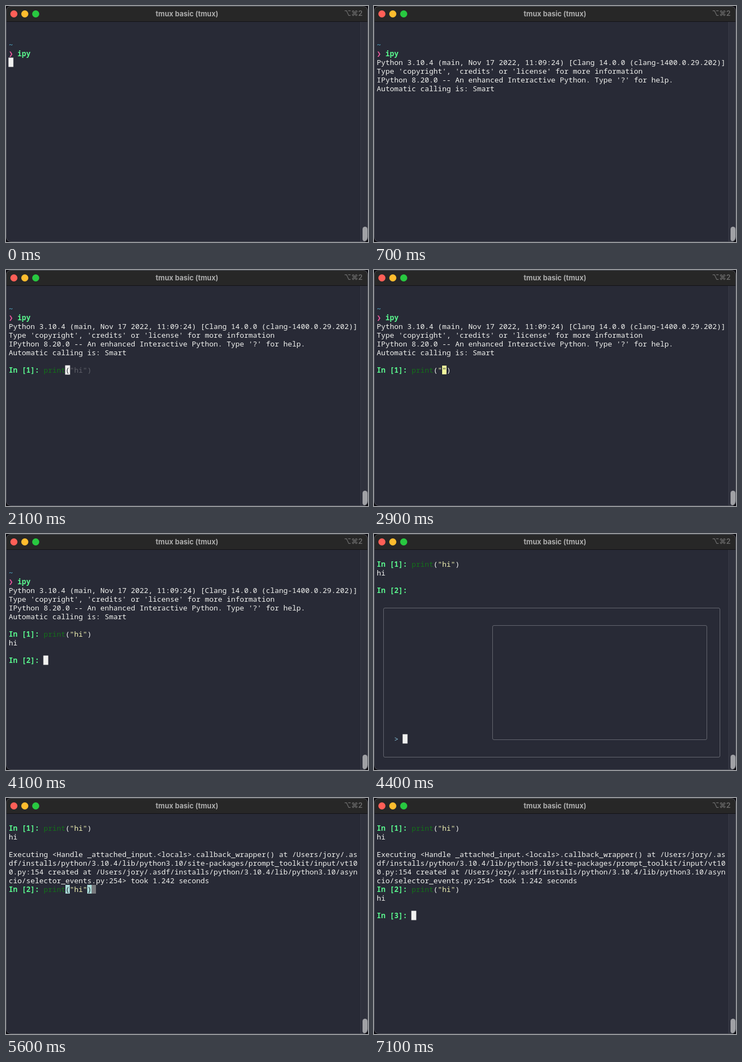
An HTML page for the animation above (8000 ms loop, 664x432 px).

```html
<!DOCTYPE html>
<html lang="en">
<head>
<meta charset="utf-8">
<title>Terminal</title>
<style>
html, body { margin: 0; width: 100%; height: 100%; overflow: hidden; background: #0c0b10; }
#win { position: absolute; left: 0; top: 0; width: 664px; height: 432px; box-sizing: border-box; overflow: hidden; border-radius: 9px; background: #282a36; }
#edge { position: absolute; inset: 0; border: 1px solid #50525a; border-radius: 9px; }
#bar { position: absolute; left: 0; top: 0; width: 664px; height: 28px; background: #272727; border-bottom: 1px solid #121216; color: #acacac; font: 700 13px/28px Inter, sans-serif; text-align: center; }
#bar i { position: absolute; top: 7.5px; width: 13px; height: 13px; border-radius: 50%; }
#bar span { position: absolute; right: 10px; top: -1px; color: #6b6b6b; font: 600 13px/28px Inter, "DejaVu Sans", sans-serif; }
#track { position: absolute; left: 650px; top: 29px; width: 14px; height: 403px; box-sizing: border-box; background: #2f313d; border-left: 1px solid #3a3c47; }
#track i { position: absolute; left: 3px; top: 374.5px; width: 9px; height: 27px; border-radius: 5px; background: #a0a1a5; }
#term { position: absolute; left: 5px; top: 31px; color: #f1f2ef; font: 500 13.333px/16px "Noto Sans Mono", "DejaVu Sans Mono", monospace; white-space: pre; font-variant-ligatures: none; }
.row { height: 16px; }
.row span { display: inline-block; height: 16px; vertical-align: top; }
.cur { background: #f1f1f0; color: #282a36; min-width: 8px; box-shadow: 0 0 0 .5px #f1f1f0; }
.str { color: #eff1b2; }
.curStr { background: #f3f99d; color: #282a36; }
.fade { background: #77797d; min-width: 8px; }
.match { background: #aadad8; color: #20252b; }
.fn { color: #14701a; }
.hint { color: #5e6068; }
.ok { color: #5af78e; font-weight: 600; }
.num { color: #5af78e; font-weight: 700; }
.cmd { color: #5af78e; font-weight: 600; }
.dir { color: #57b8d8; }
.arrow { color: #f0599f; }
.gut { background: #303030; color: #f0483f; font-weight: 700; }
.sel { background: #303030; font-weight: 700; }
.info { color: #a5a686; }
.rule { color: #666870; }
.ask { color: #87bfd7; }
.line { color: #494b55; }
.salmon { color: #dc9c93; }
.box { position: absolute; border: 1px solid #656770; border-radius: 3px; box-sizing: border-box; }
</style>
</head>
<body>
<div id="win">
  <div id="bar">
    <i style="left:7.5px;background:#ff5f57"></i>
    <i style="left:27.5px;background:#febc2e"></i>
    <i style="left:47.5px;background:#28c840"></i>
    tmux basic (tmux)<span>⌥⌘2</span>
  </div>
  <div id="track"><i></i></div>
  <div id="term"></div>
  <div id="edge"></div>
</div>
<script>
const LOOP = 8000;
const term = document.getElementById('term');
const s = (cls, text = '') => `<span class="${cls}">${text}</span>`;
const esc = text => text.replace(/</g, '&lt;').replace(/>/g, '&gt;');
const prompt = (n, input = '') => s('ok', 'In [') + s('num', n) + s('ok', ']:') + ' ' + input;
const fn = s('fn', 'print');
const cursor = s('cur');

const full = 'print("hi")';
const done = fn + '(' + s('str', '"hi"') + ')';
const matched = end => fn + s('match', '(') + s('str', '"hi"') + s('match', ')') + end;

// First n letters typed, the rest suggested from history
const typed = n => (n < 5 ? full.slice(0, n) : fn) + s('cur', full[n]) + s('hint', full.slice(n + 1));
const quoted = text => fn + '(' + s('str', '"' + text) + s('curStr', '"') + ')';

const shell = ['', '', s('dir', '~'), s('arrow', '❯') + ' ' + s('cmd', 'ipy')];
const banner = [...shell,
  'Python 3.10.4 (main, Nov 17 2022, 11:09:24) [Clang 14.0.0 (clang-1400.0.29.202)]',
  "Type 'copyright', 'credits' or 'license' for more information",
  "IPython 8.20.0 -- An enhanced Interactive Python. Type '?' for help.",
  'Automatic calling is: Smart', ''];
const first = input => [...banner, prompt(1, input)];
const printed = [...first(done), 'hi', ''];
const scrolled = ['', prompt(1, done), 'hi', ''];

const slow = [...scrolled, ...[
  'Executing <Handle _attached_input.<locals>.callback_wrapper() at /Users/jory/.as',
  'df/installs/python/3.10.4/lib/python3.10/site-packages/prompt_toolkit/input/vt10',
  '0.py:154 created at /Users/jory/.asdf/installs/python/3.10.4/lib/python3.10/asyn',
  'cio/selector_events.py:254> took 1.242 seconds'].map(esc)];
const second = input => [...slow, prompt(2, input)];

const box = (x, y, w, h) =>
  `<div class="box" style="left:${x - 5}px;top:${y - 31}px;width:${w}px;height:${h}px"></div>`;
const history = ['%clip rest_api_re..', '%load_ext ipython..', '%clip', 'clip',
  '    ns.rest_api._..', '    catalog = awa..', 'a = "hi"', 'boom', 'a', 'ls', 'clear'];

function finder(filled) {
  const rows = [...scrolled, prompt(2), '', '', ''];
  if (filled) {
    const preview = s('line', '1') + ' print(' + s('salmon', '"hi"') + ')';
    history.forEach((item, i) => rows.push('    ' + s('gut', ' ') + ' ' +
      (i === 1 ? item.padEnd(25) + preview : item)));
    rows.push('    ' + s('gut', '&gt;') + ' ' + s('sel', full) + ' '.repeat(8) + s('rule', '│'),
      '      ' + s('info', '1551/1551 (0)') + ' ' + s('rule', '─────'));
  } else {
    rows.push(...Array(13).fill(''));
  }
  rows.push('    ' + s('ask', '&gt;') + ' ' + cursor);
  rows[0] = box(17, 135, 618, 274) + box(217, 167, 394, 210);
  return rows;
}

const scenes = [
  [0, [...shell, cursor]],
  [700, banner],
  [800, first(cursor)],
  ...[1, 2, 3, 4, 5].map(n => [1500 + 100 * n, first(typed(n))]),
  [2300, first(fn + s('match', '(') + s('cur', ')'))],
  [2700, first(quoted(''))],
  [3000, first(quoted('h'))],
  [3100, first(quoted('hi'))],
  [3300, first(fn + s('match', '(') + s('str', '"hi"') + s('cur', ')'))],
  [3500, first(matched(cursor))],
  [3800, first(done)],
  [3900, [...printed, prompt(2, cursor)]],
  [4400, finder(false)],
  [4500, finder(true)],
  [5600, second(matched(s('fade')))],
  [5700, second(matched(cursor))],
  [6000, second(done)],
  [6100, [...second(done), 'hi', '', prompt(3, cursor)]]
].map(([at, rows]) => ({ at, html: rows.map(r => `<div class="row">${r}</div>`).join('') }));

let shown;
function draw() {
  const t = performance.now() % LOOP;
  const scene = scenes.findLast(item => item.at <= t);
  if (scene !== shown) {
    term.innerHTML = scene.html;
    shown = scene;
  }
  requestAnimationFrame(draw);
}
draw();
</script>
</body>
</html>
```
